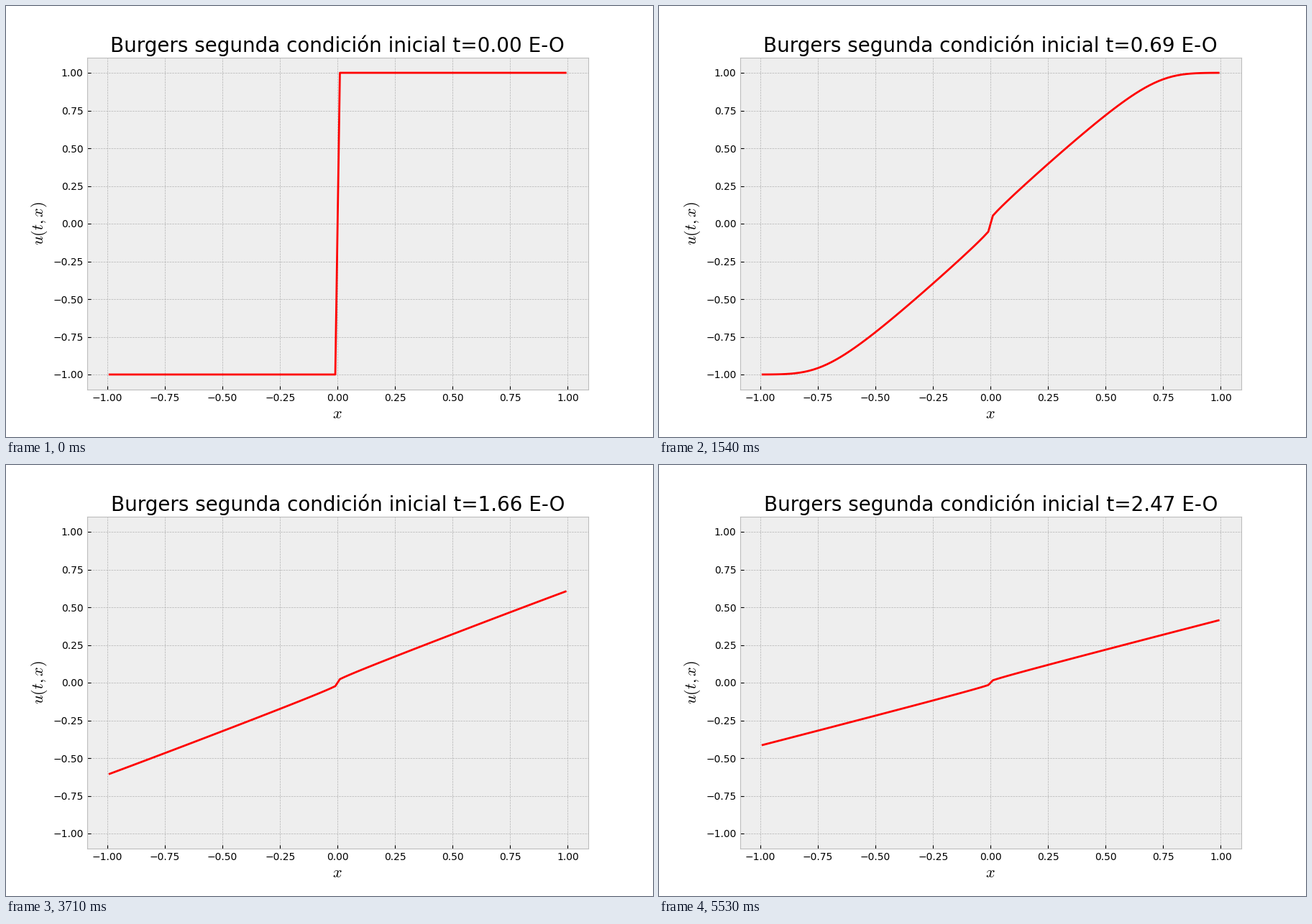
These frames come from a looping animation (900x600 px, 5.6 s). A matplotlib script:

```python
import numpy as np
import matplotlib.pyplot as plt
from matplotlib.animation import FuncAnimation

FRAMES = 80
INTERVAL = 70
CELLS = 100
T_END = 2.5
SUBSTEPS = 4

dx = 2 / CELLS
dt = T_END / (FRAMES * SUBSTEPS)
x = -1 + dx * (np.arange(CELLS) + 0.5)


def step(u):
    """Advance Burgers' equation one step with the Engquist-Osher flux."""
    padded = np.concatenate(([u[0]], u, [u[-1]]))
    left, right = padded[:-1], padded[1:]
    flux = (np.maximum(left, 0) ** 2 + np.minimum(right, 0) ** 2) / 2
    return u - dt / dx * np.diff(flux)


def solve():
    u = np.sign(x)
    history = [u]
    for _ in range(FRAMES - 1):
        for _ in range(SUBSTEPS):
            u = step(u)
        history.append(u)
    return history


history = solve()

plt.style.use("bmh")
plt.rcParams["font.family"] = "DejaVu Sans"
fig, ax = plt.subplots(figsize=(9, 6), dpi=100)
fig.patch.set_facecolor("white")
line, = ax.plot(x, history[0], color="red", linewidth=2)
ax.set_xlim(-1.089, 1.089)
ax.set_ylim(-1.1, 1.1)
ax.set_xlabel("$x$", fontsize=16)
ax.set_ylabel("$u(t,x)$", fontsize=16)
title = ax.set_title("", fontsize=20)


def update(i):
    t = i * SUBSTEPS * dt
    line.set_ydata(history[i])
    title.set_text(f"Burgers segunda condición inicial t={t:.2f} E-O")
    return line, title


anim = FuncAnimation(fig, update, frames=FRAMES, interval=INTERVAL,
                     init_func=lambda: update(0), repeat=True, repeat_delay=0)
plt.show()
```
